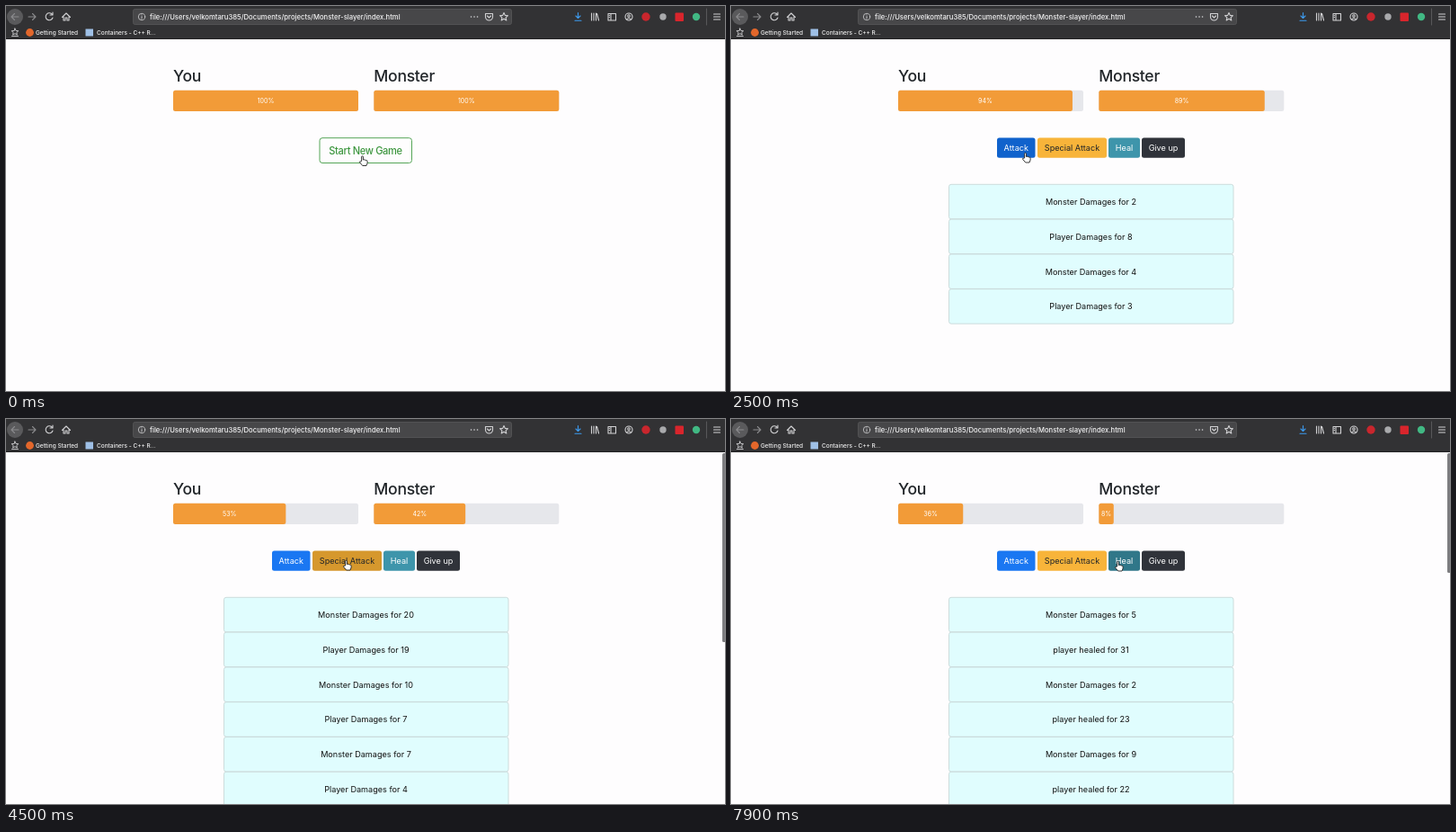
Recreate the animation shown at these times as an HTML page. Size 800 by 428 pixels, loop 8000 ms.

```html
<!DOCTYPE html>
<html lang="en">
<head>
<meta charset="utf-8">
<title>Monster slayer</title>
<style>
  html, body { margin: 0; width: 100%; height: 100%; overflow: hidden; background: #fefdfe; }
  svg { display: block; font: 9.1px Inter, "Open Sans", sans-serif; }
  .head { font-size: 17.6px; font-weight: 500; letter-spacing: -.3px; fill: #212529; }
  .start { font-size: 11.1px; font-weight: 500; letter-spacing: -.35px; fill: #3d963f; }
  .pct { font-size: 7px; fill: #fff; }
  .mid { text-anchor: middle; }
  .url { font-size: 7.7px; font-weight: 500; fill: #f4f4f5; }
  .mark { font-size: 6.5px; font-weight: 500; fill: #eee; }
  .icon { fill: none; stroke: #d2d2d4; stroke-width: 1.1; stroke-linecap: round; stroke-linejoin: round; }
</style>
</head>
<body>
<svg width="800" height="428" viewBox="0 0 800 428">
  <rect width="800" height="428" fill="#fefdfe"/>
  <g id="game"></g>
  <rect width="800" height="37" fill="#323234"/>
  <rect y="36.3" width="800" height=".7" fill="#1c1c1e"/>
  <circle cx="10" cy="12" r="9" fill="#5a5a5c"/>
  <rect x="141.5" y="3.5" width="421" height="17" rx="2" fill="#474749" stroke="#58585a" stroke-width=".8"/>
  <g class="icon">
    <path stroke="#8b8b8d" d="M14 12H6m3.5-3.5L6 12l3.5 3.5M25 12h8m-3.5-3.5L33 12l-3.5 3.5"/>
    <path d="M51.5 9.5a4 4 0 1 0 .5 3.5M52 7v3h-3M62.5 12.5L67 8l4.500 4.500M64 12v4h2v-3h2v3h2v-4"/>
    <circle cx="151" cy="12" r="3.7" stroke-width=".8"/>
    <path stroke-width=".9" d="M151 11.600V14M151 9.900v.1"/>
    <path stroke-width="1.600" d="M517.500 12h.1M521 12h.1M524.500 12h.1"/>
    <path d="M533.500 8.500h8v3.500a4 4 0 0 1-8 0zM535.500 11l2 2 2-2"/>
    <path d="M554 7.500l1.300 2.900 3.200.3-2.400 2.100.7 3.200-2.800-1.700-2.800 1.700.7-3.200-2.400-2.100 3.200-.3z"/>
    <path stroke="#3d9cf0" d="M636.500 7.500v6m-2.500-2.500l2.500 2.500 2.500-2.500M633 16.200h7"/>
    <path d="M651.500 8v8M654 8v8M656.500 8v8M657.500 8.500l2 7.500"/>
    <path d="M670 8.500h8.500v7.500H670zM673 8.500V16M671.300 10.500h.2M671.300 12.500h.2"/>
    <circle cx="693" cy="12" r="4"/><circle cx="693" cy="11" r="1.300"/><path d="M690.600 14.700q2.400-2 4.800 0"/>
    <path d="M787.500 9h7M787.500 12h7M787.500 15h7"/>
    <path stroke="#58585a" d="M779.500 3v18"/>
    <path stroke-width=".9" d="M10 25l1.100 2.500 2.700.2-2 1.800.6 2.600-2.400-1.400-2.400 1.400.6-2.600-2-1.800 2.700-.2zM6.500 33.500h7"/>
  </g>
  <circle cx="712" cy="12" r="4.700" fill="#c9262d"/>
  <circle cx="731" cy="12" r="3.700" fill="#a9aaac"/>
  <rect x="744.500" y="7.500" width="9.500" height="9.500" rx="1" fill="#d9252c"/>
  <circle cx="768" cy="12" r="4.200" fill="#41b883"/>
  <circle cx="26.500" cy="29.500" r="4.400" fill="#e3672b"/>
  <rect x="88.500" y="25.500" width="8.500" height="8" fill="#9fc0e6"/>
  <text class="url" x="160" y="15">file:///Users/velkomtaru385/Documents/projects/Monster-slayer/index.html</text>
  <text class="mark" x="33" y="32">Getting Started</text>
  <text class="mark" x="101" y="32">Containers - C++ R...</text>
  <path id="hand" fill="#fff" stroke="#222" stroke-width=".9" stroke-linejoin="round"
    d="M-.9 5.500V.7a.9.9 0 0 1 1.800 0V4q.9-.7 1.700.2.900-.5 1.600.4 1.400-.3 1.400 1.200v1.800L4.500 10.500H.2L-3 6.700q0-1.500 1.300-.900z"/>
</svg>
<script>
const LOOP = 8000, START = 500;
const game = document.getElementById('game'), hand = document.getElementById('hand');

// time, player's number, monster's hit, whether the player heals
const turns = [
  [1690, 3, 4], [2090, 8, 2], [2590, 8, 2], [2890, 9, 2], [3190, 4, 7], [3690, 7, 10],
  [4290, 19, 20], [4790, 15, 14], [5390, 19, 17],
  [6690, 22, 9, 1], [7090, 23, 2, 1], [7590, 31, 5, 1]
];

// time, x, y of the pointer tip
const path = [
  [0, 396.5, 167], [700, 396.5, 167], [1300, 327.500, 163.500], [3800, 327.500, 163.500],
  [4200, 378.500, 157.500], [5600, 378.500, 157.500], [6200, 430.500, 158.500], [LOOP, 430.500, 158.500]
];

const buttons = [
  ['Attack', 296, 42.500, '#1a77f2', '#1062cc', '#fff'],
  ['Special Attack', 341, 77, '#f8b43a', '#d6982d', '#212529'],
  ['Heal', 420, 35, '#3e95ab', '#307789', '#fff'],
  ['Give up', 457, 48, '#30333a', '#202329', '#fff']
];

const rect = (x, y, w, h, fill, extra = 'rx="2.500"') =>
  `<rect x="${x}" y="${y}" width="${w}" height="${h}" fill="${fill}" ${extra}/>`;
const text = (s, x, y, cls = 'mid', fill) =>
  `<text x="${x}" y="${y}" class="${cls}" ${fill ? `fill="${fill}"` : ''}>${s}</text>`;

// CSS "ease": cubic-bezier(.25, .1, .25, 1)
function ease(x) {
  if (x >= 1) return 1;
  const curve = (a, b, u) => 3 * a * u * (1 - u) ** 2 + 3 * b * u * u * (1 - u) + u ** 3;
  let lo = 0, hi = 1;
  for (let i = 0; i < 20; i++) {
    const u = (lo + hi) / 2;
    if (curve(.25, .25, u) < x) lo = u; else hi = u;
  }
  return curve(.1, 1, lo);
}

function health(past, t, change) {
  let value = 100, shown = 100;
  past.forEach((turn, i) => {
    value += change(turn);
    const end = past[i + 1] ? past[i + 1][0] : t;
    shown += (value - shown) * ease((end - turn[0]) / 600);
  });
  return { value, shown };
}

function bar(name, x, { value, shown }) {
  const w = 2.06 * shown;
  return text(name, x, 84, 'head') + rect(x, 93.700, 206, 23.300, '#e6e7eb') +
    rect(x, 93.700, w, 23.300, '#f29b38') + text(value + '%', x + w / 2, 108, 'pct mid');
}

function pointer(t) {
  const i = path.findIndex(p => p[0] > t), [t0, x0, y0] = path[i - 1], [t1, x1, y1] = path[i];
  const u = (t - t0) / (t1 - t0), k = u * u * (3 - 2 * u);
  return [x0 + (x1 - x0) * k, y0 + (y1 - y0) * k];
}

function draw(now) {
  const t = now % LOOP, past = turns.filter(turn => turn[0] <= t);
  const [px, py] = pointer(t);
  let out = bar('You', 186, health(past, t, ([, , hit, heals]) => (heals ? 10 : 0) - hit)) +
    bar('Monster', 409.300, health(past, t, ([, n, , heals]) => heals ? 0 : -n));

  if (t < START) {
    out += rect(349, 146.700, 102.500, 27.800, '#fefdfe', 'rx="3" stroke="#55a557"') +
      text('Start New Game', 400, 165, 'start mid');
  } else {
    for (const [label, x, w, color, hover, ink] of buttons)
      out += rect(x, 146.500, w, 22.300, px >= x && px <= x + w ? hover : color) +
        text(label, x + w / 2, 161, 'mid', ink);
  }

  const log = past.flatMap(([, n, hit, heals]) =>
    [heals ? `player healed for ${n}` : `Player Damages for ${n}`, `Monster Damages for ${hit}`]).reverse();
  log.slice(0, 6).forEach((line, i) => {
    const y = 198.300 + 38.800 * i;
    out += rect(242.500, y, 316.500, 38.500, '#e0fdfe', 'rx="2.500" stroke="#c9d8d9" stroke-width=".9"') +
      text(line, 400.500, y + 22.700, 'mid', '#111');
  });
  if (log.length > 5)
    out += rect(797, 38, 4, Math.min(387, 390 * 390 / (136 + 42 * log.length)), '#7d7d80', 'rx="1.500"');

  game.innerHTML = out;
  hand.setAttribute('transform', `translate(${px} ${py})`);
}

const origin = performance.now();
function tick() {
  draw(performance.now() - origin);
  requestAnimationFrame(tick);
}
tick();
</script>
</body>
</html>
```
